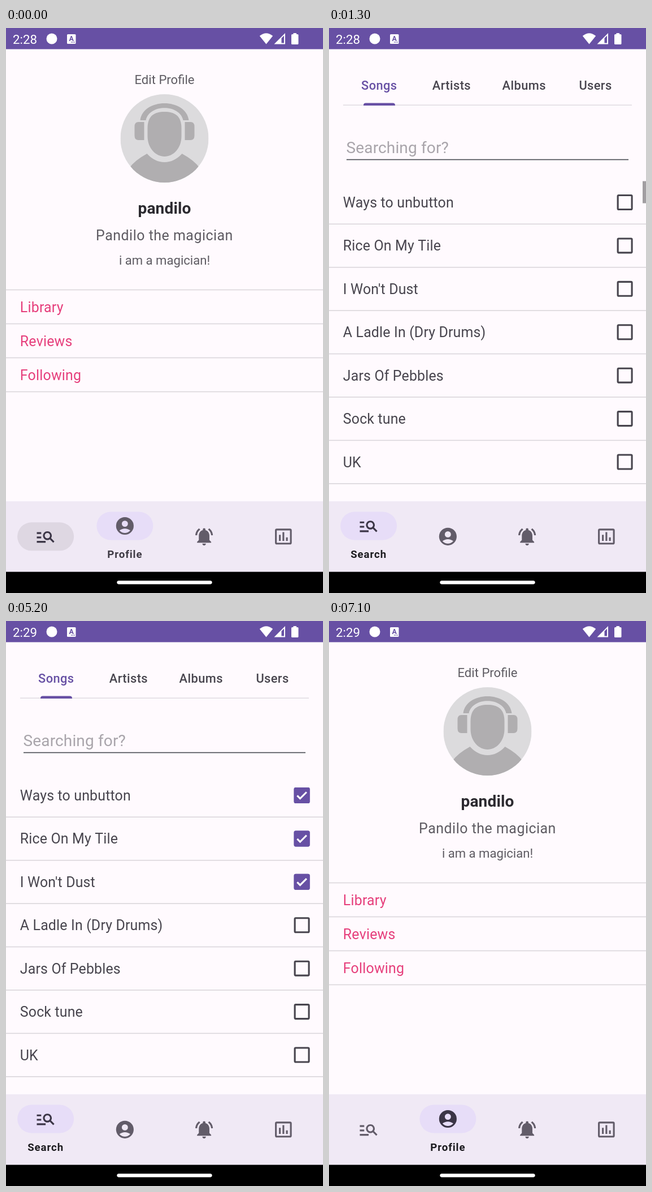
An HTML page with a canvas that plays this animation: 561x998 px, repeating every 8 s.

```html
<!DOCTYPE html>
<html lang="en">
<head>
<meta charset="utf-8">
<title>Music app</title>
<style>
html, body { margin: 0; width: 100%; height: 100%; overflow: hidden; background: #000; }
canvas { display: block; width: 561px; height: 998px; }
</style>
</head>
<body>
<canvas id="stage"></canvas>
<script>
const W = 561, H = 998, LOOP = 8000, STEP = 100;
const DP = W / 360, BAR = 24 * DP, FLOOR = H - BAR;
const PURPLE = '#6750a4', PAPER = '#fffafe', INK = '#48454e', NAV = '#f0e9f5';
const LINE = '#dad6db', PINK = '#e63f7c', GREY = '#5e5b62';

const canvas = document.getElementById('stage');
const ctx = canvas.getContext('2d');
const dpr = window.devicePixelRatio || 1;
canvas.width = W * dpr;
canvas.height = H * dpr;

const icons = [
  // search list
  'M7 9H2V7h5v2zm0 3H2v2h5v-2zm13.59 7l-3.83-3.83c-.8.52-1.74.83-2.76.83-2.76 0-5-2.24-5-5s2.24-5 5-5 5 2.24 5 5c0 1.02-.31 1.96-.83 2.75L22 17.59 20.59 19zM17 11c0-1.65-1.35-3-3-3s-3 1.35-3 3 1.35 3 3 3 3-1.35 3-3zM2 19h10v-2H2v2z',
  // account
  'M12 2a10 10 0 1 0 0 20a10 10 0 1 0 0-20zM12 6a3.5 3.5 0 1 1 0 7a3.5 3.5 0 1 1 0-7zM12 20c-2.03 0-4.43-.82-6.14-2.88C7.55 15.8 9.68 15 12 15s4.45.8 6.14 2.12C16.43 19.18 14.03 20 12 20z',
  // bell
  'M7.58 4.08L6.15 2.65C3.75 4.48 2.17 7.3 2.03 10.5h2c.15-2.65 1.51-4.97 3.55-6.42zM19.97 10.5h2c-.15-3.2-1.73-6.02-4.12-7.85l-1.42 1.43c2.02 1.45 3.39 3.77 3.54 6.42zM18 11c0-3.07-1.64-5.64-4.5-6.32V4a1.5 1.5 0 0 0-3 0v.68C7.63 5.36 6 7.92 6 11v5l-2 2v1h16v-1l-2-2zM12 22a2 2 0 0 0 2-2h-4a2 2 0 0 0 2 2z',
  // chart
  'M4.5 3h15a2 2 0 0 1 2 2v14a2 2 0 0 1-2 2h-15a2 2 0 0 1-2-2V5a2 2 0 0 1 2-2zM4.5 5v14.1h15V5zM7 10h2v7H7zM11 7h2v10h-2zM15 13h2v4h-2z'
].map(d => new Path2D(d));

const tabs = [['Songs', 57.1], ['Artists', 182.8], ['Albums', 306.6], ['Users', 442.4]];
const songs = ['Ways to unbutton', 'Rice On My Tile', "I Won't Dust",
  'A Ladle In (Dry Drums)', 'Jars Of Pebbles', 'Sock tune', 'UK'];
const checkTimes = [2700, 3400, 4500];

const clamp = v => Math.max(0, Math.min(1, v));
const ramp = (t, from, to) => clamp((t - from) / (to - from));
const cubic = (a, b, c, d, s) => {
  const r = 1 - s;
  return a * r * r * r + 3 * b * r * r * s + 3 * c * r * s * s + d * s * s * s;
};

// Fast start, very slow settle: two joined Bezier pieces.
function slideEase(x) {
  if (x <= 0) return 0;
  if (x >= 1) return 1;
  const early = x < 1 / 6;
  const px = early ? [0, .05, .1333, 1 / 6] : [1 / 6, .2083, .25, 1];
  const py = early ? [0, 0, .06, .4] : [.4, .82, 1, 1];
  let lo = 0, hi = 1;
  for (let i = 0; i < 30; i++) {
    const mid = (lo + hi) / 2;
    if (cubic(...px, mid) < x) lo = mid; else hi = mid;
  }
  return cubic(...py, lo);
}

function text(str, x, y, size, color, { weight = 400, align = 'left', gap = 0 } = {}) {
  ctx.font = `${weight} ${size}px Roboto, sans-serif`;
  ctx.letterSpacing = gap + 'px';
  ctx.textAlign = align;
  ctx.fillStyle = color;
  ctx.fillText(str, x, y);
}

function rect(x, y, w, h, color) {
  ctx.fillStyle = color;
  ctx.fillRect(x, y, w, h);
}

function round(x, y, w, h, r, color) {
  ctx.fillStyle = color;
  ctx.beginPath();
  ctx.roundRect(x, y, w, h, r);
  ctx.fill();
}

function disc(x, y, r, color) {
  ctx.fillStyle = color;
  ctx.beginPath();
  ctx.arc(x, y, r, 0, 7);
  ctx.fill();
}

function shape(d, color) {
  ctx.fillStyle = color;
  ctx.fill(new Path2D(d));
}

// Lines run past both sides so a sliding page shows no gap.
const divider = y => rect(-80, y - .8, W + 160, 1.6, LINE);

// shown: item with pill and label; lit: item in the dark colour
function navBar(shown, lit, touched, touch) {
  rect(-80, 836, W + 160, 125, NAV);
  icons.forEach((icon, i) => {
    const x = W / 8 * (2 * i + 1), on = i === shown, y = on ? 879.5 : 898.3;
    if (on) {
      round(x - 50, y - 25, 100, 50, 25, '#e7ddf8');
      text(['Search', 'Profile'][i], x, 935.7, 18.7, i === lit ? '#1c1b1f' : '#3f3b45',
        { weight: 700, align: 'center', gap: .9 });
    }
    if (i === touched && touch > 0)
      round(x - 50, y - 25, 100, 50, 25, `rgba(73,69,79,${.11 * touch})`);
    ctx.save();
    ctx.translate(x, y);
    ctx.scale(DP, DP);
    ctx.translate(-12, -12);
    ctx.fillStyle = i === lit ? '#3b3546' : '#625c69';
    ctx.fill(icon, 'evenodd');
    ctx.restore();
  });
}

function avatar(x, y) {
  const tone = '#b0aeb0';
  ctx.save();
  ctx.translate(x, y);
  ctx.beginPath();
  ctx.arc(0, 0, 78, 0, 7);
  ctx.clip();
  rect(-78, -78, 156, 156, '#dcdbdd');
  shape('M-80 80L-62 52Q-53 39-31 27Q-17 42 0 42Q17 42 31 27Q53 39 62 52L80 80Z', tone);
  shape('M-30-18C-30-40-18-47 0-47S30-40 30-18V-4C30 18 15 32 0 32S-30 18-30-4Z', tone);
  shape('M-43-32C-38-72 38-72 43-32H33C27-61-27-61-33-32Z', tone);
  for (const side of [-1, 1]) {
    ctx.save();
    ctx.scale(side, 1);
    shape('M36-29H46Q53-29 53-21V-5Q53 3 46 3H36Z', tone);
    ctx.restore();
  }
  ctx.restore();
}

function profilePage(nav) {
  const mid = W / 2, center = { align: 'center' };
  rect(-80, 37, W + 160, 924, PAPER);
  text('Edit Profile', mid, 98.5, 22.1, GREY, center);
  avatar(mid, 195);
  text('pandilo', mid, 328, 28.1, '#2c2a30', { weight: 700, align: 'center', gap: .1 });
  text('Pandilo the magician', mid, 375, 24.94, GREY, { align: 'center', gap: .5 });
  text('i am a magician!', mid, 418, 22.1, GREY, center);
  divider(462.5);
  ['Library', 'Reviews', 'Following'].forEach((label, i) => {
    text(label, 24.8, 502 + 60 * i, 24.94, PINK, { gap: .2 });
    divider(522.5 + 60 * i);
  });
  navBar(...nav);
}

function ripple(x, y, age) {
  const a = age < 100 ? .6 : clamp((500 - age) / 400);
  if (a <= 0) return;
  const r = age < 100 ? 22 : 31;
  const g = ctx.createRadialGradient(x, y, 10, x, y, r);
  g.addColorStop(0, `rgba(103,80,164,${.18 * a})`);
  g.addColorStop(.8, `rgba(103,80,164,${.08 * a})`);
  g.addColorStop(1, `rgba(103,80,164,${.04 * a})`);
  disc(x, y, r, g);
}

function checkbox(x, y, age) {
  const on = age >= 0, half = 8 * DP;
  if (on) {
    ripple(x, y, age);
    round(x - 14, y - 14, 28, 28, 3, `rgba(103,80,164,${ramp(age, -50, 150)})`);
  }
  ctx.strokeStyle = on ? PURPLE : INK;
  ctx.lineWidth = 2 * DP;
  ctx.beginPath();
  ctx.roundRect(x - half, y - half, 2 * half, 2 * half, DP);
  ctx.stroke();
  // Both arms of the tick grow out of its corner.
  const s = ramp(age, 10, 200);
  if (s <= 0) return;
  ctx.save();
  ctx.translate(x - 2 * DP, y + 3.6 * DP);
  ctx.scale(DP, DP);
  ctx.strokeStyle = '#fff';
  ctx.lineWidth = 2;
  ctx.beginPath();
  ctx.moveTo(-3.3 * s, -3.3 * s);
  ctx.lineTo(0, 0);
  ctx.lineTo(7.3 * s, -7.3 * s);
  ctx.stroke();
  ctx.restore();
}

function songsPage(t, nav) {
  rect(-80, 37, W + 160, 924, PAPER);
  rect(25, 135.4, 511, 1.6, '#e1dde3');
  tabs.forEach(([label, x], i) =>
    text(label, x, 108.7, 21.83, i ? INK : PURPLE, { weight: 500, gap: .4 }));
  round(61, 132.4, 56, 4.7, [4, 4, 0, 0], PURPLE);
  text('Searching for?', 30.5, 221, 28.07, '#a9a5ab', { gap: .12 });
  rect(31, 231.7, 499, 1.6, '#46494f');
  songs.forEach((name, i) => {
    const y = 308 + 76.42 * i;
    text(name, 24.8, y + 9, 24.94, INK, { gap: .15 });
    divider(y + 38.3);
    checkbox(523.6, y, t - (checkTimes[i] || LOOP));
  });
  const bar = .37 * (1 - ramp(t, 2340, 2650));
  if (bar > 0) rect(555, 270.5, 86, 39, `rgba(0,0,0,${bar})`);
  navBar(...nav);
}

// The old page drifts left while the new one slides over it.
function slide(age, before, after) {
  const p = slideEase(age / 450), shift = W / 10;
  const layer = (x, alpha, paint) => {
    if (alpha <= 0) return;
    ctx.save();
    ctx.globalAlpha = alpha;
    ctx.translate(x, 0);
    paint();
    ctx.restore();
  };
  const fade = ramp(age, 50, 133);
  if (fade < 1) layer(-shift * p, 1, before);
  layer(shift * (1 - p), fade, after);
}

function systemBars(t) {
  rect(0, 0, W, BAR, PURPLE);
  text(t < 1900 ? '2:28' : '2:29', 12, 27.6, 22.3, '#fff');
  disc(81, 19, 9.5, '#fff');
  round(108, 11, 15.5, 17, 1.5, '#fff');
  text('A', 115.6, 22.6, 12.5, PURPLE, { weight: 700, align: 'center' });
  for (const x of [115, 117.6, 120.2]) rect(x, 24.3, 1.5, 1.5, PURPLE);
  shape('M460.5 28.5L448.8 14Q460.5 4.5 472.2 14Z', '#fff');
  shape('M474.5 28.5L494 9V28.5Z', '#fff');
  shape('M487.5 18L492 13.5V26.5H487.5Z', PURPLE);
  round(505, 11, 12.5, 18, 1.6, '#fff');
  rect(508.5, 9, 5.5, 3, '#fff');
  rect(0, FLOOR, W, BAR, '#000');
  round(W / 2 - 54 * DP, FLOOR + 10 * DP, 108 * DP, 4 * DP, 2 * DP, '#fff');
}

function draw(t) {
  ctx.setTransform(dpr, 0, 0, dpr, 0, 0);
  const leaving = t >= 6400;
  const songsNav = leaving ? [0, 1, 1, ramp(t, 6300, 6500)] : [0, 0];
  const profileNav = t < 766 + 450 ? [1, 0, 0, 1 - ramp(t, 0, 400)] : [1, 1];
  const songsView = () => songsPage(t, songsNav);
  const profileView = () => profilePage(profileNav);
  if (t < 766) profileView();
  else if (t < 6647) slide(t - 766, profileView, songsView);
  else slide(t - 6647, songsView, profileView);
  systemBars(t);
}

const start = performance.now();
function tick() {
  const t = (performance.now() - start) % LOOP;
  draw(Math.floor(t / STEP) * STEP);
  requestAnimationFrame(tick);
}
tick();
</script>
</body>
</html>
```
